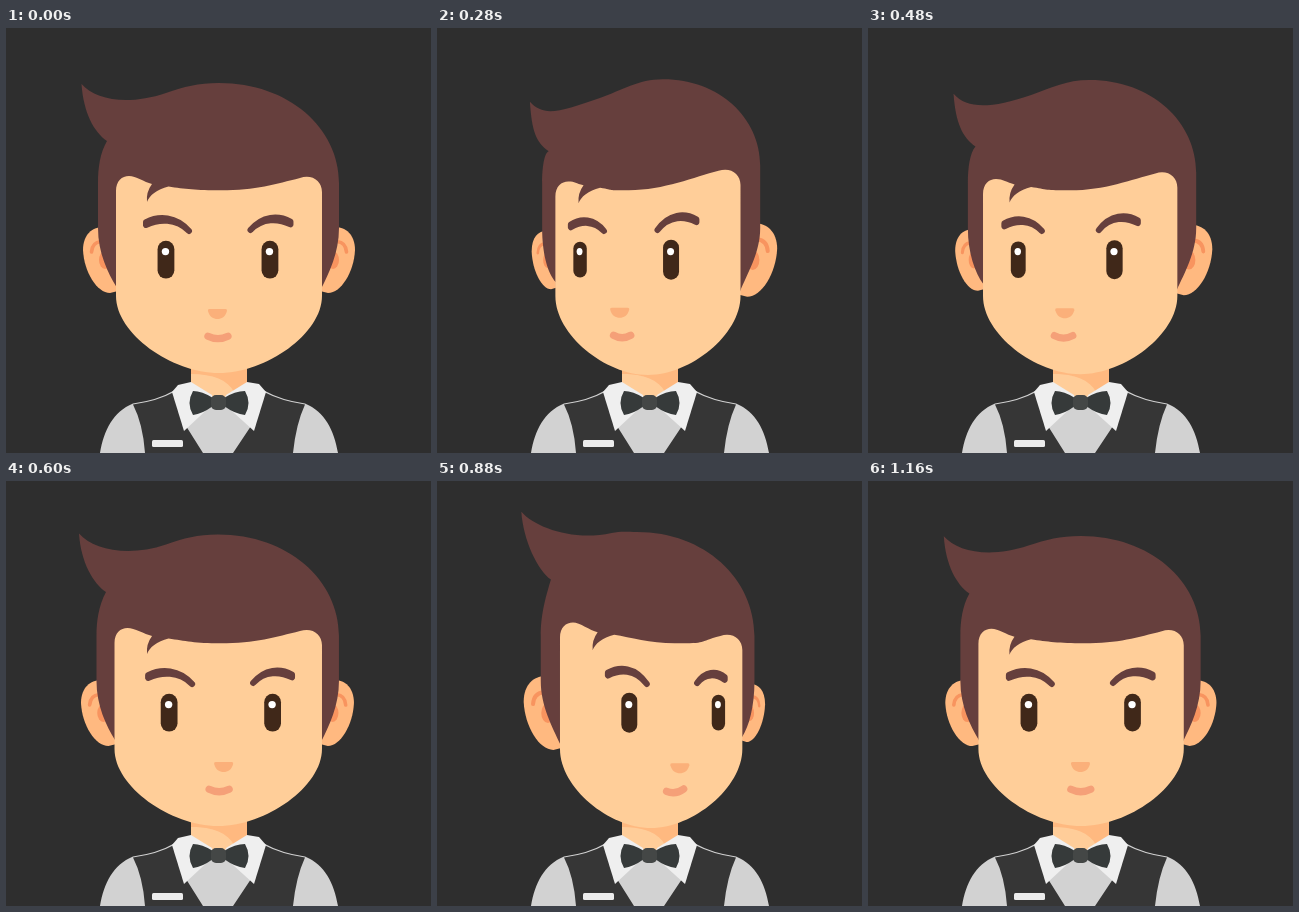
An HTML page for the animation above (1200 ms loop, 425 px wide and 425 px high).

```html
<!DOCTYPE html>
<html lang="en">
<head>
<meta charset="utf-8">
<title>Turning head</title>
<style>
  html, body { margin: 0; width: 100%; height: 100%; overflow: hidden; background: #2e2e2e; }
  svg { display: block; width: 100%; height: 100%; }
  .stroke { fill: none; stroke-linecap: round; }
</style>
</head>
<body>
<svg viewBox="0 0 425 425">
  <rect width="425" height="425" fill="#2e2e2e"/>
  <g id="body">
    <path fill="#d2d2d2" d="M94 425C98 402 107 384 127 375.500Q152 372 168 362.500H258Q275 372 299 375.500C319 384 328 402 332 425Z"/>
    <path fill="#363636" d="M127 376.500Q152 373 168 364L180 398L197 425H139Q137 396 127 376.500Z"/>
    <path fill="#363636" d="M299 376.500Q275 373 258 364L245 398L227 425H287Q290 396 299 376.500Z"/>
    <path fill="#ffcd99" d="M185 335H241V360L213 372L185 358Z"/>
    <path fill="#ffb980" d="M185 335H241V358L228 364C222 352 207 346 185 346Z"/>
    <path fill="#efefef" d="M185 354L172 357L166 364L178 403L208 375L206 367Z"/>
    <path fill="#efefef" d="M241 354L253 356L260 364L248 403L217 375L220 367Z"/>
    <path fill="#363a3a" d="M187 363Q196 363 207 370V378Q196 386 187 387Q180 375 187 363ZM239 363Q229 363 218 370V378Q229 386 239 387Q246 375 239 363Z"/>
    <rect x="205" y="367" width="15" height="15" rx="5" fill="#444746"/>
    <rect x="146" y="412" width="31" height="7" rx="1.5" fill="#ececec"/>
  </g>
  <defs>
    <g id="ear">
      <path fill="#ffb980" d="M24 1C14 -2 0 4 0 23C1 45 14 66 27 66L35 64V8Z"/>
      <ellipse cx="22" cy="33" rx="6" ry="9" fill="#f8945f"/>
      <path class="stroke" stroke="#f8945f" stroke-width="3.6" d="M8.500 25C9 18 13 15 18 14.500"/>
    </g>
  </defs>
  <use id="earL" href="#ear"/>
  <use id="earR" href="#ear"/>
  <path id="hair" fill="#663f3d"/>
  <path id="face" fill="#ffce99"/>
  <g fill="#663f3d" stroke="#663f3d" stroke-width="6" stroke-linejoin="round">
    <path id="browL"/>
    <path id="browR"/>
  </g>
  <g fill="#402819"><rect id="eyeL"/><rect id="eyeR"/></g>
  <g fill="#fff"><ellipse id="glintL" ry="3.6"/><ellipse id="glintR" ry="3.6"/></g>
  <path id="nose" fill="#fbb07a" d="M-8 0H8Q10 0 9.500 2C8 8 4 10 0 10C-4 10 -8 8 -9.500 2Q-10 0 -8 0Z"/>
  <path id="mouth" class="stroke" stroke="#f5a078" stroke-width="7.300"/>
</svg>
<script>
const LOOP = 1200;
const TIMES = [0, 160, 400, 600, 760, 1000, 1160];

// Each track holds its value at the first six times; the last eases back to the first.
const headTracks = {
  turn: [0, -.95, -1, 0, 1, .95],
  left: [110, 114, 120, 108.5, 120, 121],
  right: [316, 307, 304, 316, 304.5, 310],
  browTop: [148, 152, 153, 147, 142, 143],
  templeTop: [149, 144, 142, 149, 153, 153],
  tuftX: [141, 140, 143, 141, 152.5, 153.5],
  tuftY: [174, 175, 175, 173, 170, 170],
  tipX: [75.5, 86, 94, 73, 82, 83],
  tipY: [56, 69.5, 72, 52.5, 33, 37],
  nickX: [101, 107, 113, 100, 111, 112],
  nickY: [113, 121, 122, 111, 100, 102],
  waveX: [160, 160, 165, 160, 172, 172],
  crownX: [213, 222, 226, 212, 200, 204],
  crownY: [55, 52.5, 51, 53.5, 51, 52]
};
const sideTracks = {
  hairL: [92, 99.5, 106.5, 90.5, 101, 102],
  hairR: [333, 326, 323.5, 333, 317, 323.5],
  earL: [77, 88, 95.5, 75, 84.5, 85],
  earR: [349, 343, 340, 348, 328.5, 335],
  eyeL: [160, 147, 145, 163, 188.5, 185],
  eyeR: [264, 242.5, 235.5, 266.5, 279, 278],
  browLo: [140, 134.5, 135.5, 142, 168, 163],
  browLi: [183, 171, 168.5, 186, 207, 203.5],
  browRo: [284.5, 267, 260, 286, 286.5, 288],
  browRi: [244.5, 227, 222, 247, 258, 257],
  nose: [211.5, 189.5, 186, 217.5, 238.5, 237],
  mouth: [212, 192, 187, 213, 234, 233]
};
const tracks = { ...headTracks, ...sideTracks };
for (const v of Object.values(tracks)) v.push(v[0] + .04 * (v[5] - v[0]));

const el = id => document.getElementById(id);
const set = (id, attrs) => {
  for (const k in attrs) el(id).setAttribute(k, attrs[k]);
};

const COUNT = TIMES.length;
const timeAt = i => TIMES[(i + COUNT) % COUNT] + Math.floor(i / COUNT) * LOOP;

// Smooth periodic curve through unevenly spaced keys
function sample(v, t) {
  let i = COUNT - 1;
  while (TIMES[i] > t) i--;
  const at = k => v[(k + COUNT) % COUNT];
  const rate = k => (at(k + 1) - at(k)) / (timeAt(k + 1) - timeAt(k));
  const slope = k => {
    const a = timeAt(k) - timeAt(k - 1), b = timeAt(k + 1) - timeAt(k);
    return (rate(k - 1) * b + rate(k) * a) / (a + b);
  };
  const h = timeAt(i + 1) - timeAt(i), u = (t - timeAt(i)) / h, w = 1 - u;
  return at(i) * w * w * (1 + 2 * u) + at(i + 1) * u * u * (3 - 2 * u)
    + h * u * w * (slope(i) * w - slope(i + 1) * u);
}

function hairPath(p) {
  const { turn, tipX, tipY, nickX, nickY, waveX, crownX, crownY, hairL, hairR, left, right } = p;
  const waveY = crownY + 10 - 7.5 * turn;
  const run = crownX - waveX;
  const rise = .34 - .1 * Math.max(turn, 0);
  const sideY = 155 + 15 * Math.min(turn, 0);
  return `M${tipX} ${tipY}
    C${tipX + 14} ${tipY + 16} ${waveX - 38} ${waveY + 38 * rise} ${waveX} ${waveY}
    C${waveX + run * .35} ${waveY - run * .35 * rise} ${crownX - run * .4} ${crownY} ${crownX} ${crownY}
    C${crownX + (hairR - crownX) * .58} ${crownY} ${hairR} ${crownY + (sideY - crownY) * .45} ${hairR} ${sideY}
    V200 C${hairR} 225 ${right + 7} 245 ${right - .5} ${260 - 3 * turn}
    H${left + .5} V${259 + 4 * turn}
    C${left - 8} 245 ${hairL} 225 ${hairL} 200 V155
    C${hairL} 140 ${hairL + 2} 125 ${nickX} ${nickY}
    C${nickX - 13} ${nickY - 9} ${tipX + 2} ${tipY + 29} ${tipX} ${tipY}Z`;
}

function facePath(p) {
  const { turn, left: l, right: r, browTop: a, templeTop: b, tuftX: x, tuftY: y } = p;
  const cx = (l + r) / 2, half = (r - l) / 2;
  const mid = cx + 2 + 18 * turn;
  const chin = 345 + 1.7 * Math.abs(turn);
  const cheek = 268 + (chin - 268) * .49, jaw = half * .46;
  return `M${l} 268 V${a + 15} C${l} ${a + 5} ${l + 6} ${a} ${l + 13} ${a}
    C${l + 20} ${a} ${x - 3} ${y - 20} ${x + 5} ${y - 18}
    Q${x - 1} ${y - 10} ${x} ${y}
    C${x + 2} ${y - 6} ${x + 10} ${y - 13} ${x + 21.5} ${y - 15.5}
    C${x + 38} ${y - 13} ${mid - 25} 162.3 ${mid} 162.3
    C${mid + 35} 162.3 ${r - 46} ${b + 7} ${r - 22} ${b + 1}
    C${r - 10} ${b - 3} ${r} ${b + 4} ${r} ${b + 15} V268
    C${r} ${cheek} ${cx + jaw} ${chin} ${cx} ${chin}
    C${cx - jaw} ${chin} ${l} ${cheek} ${l} 268Z`;
}

// Thick at the outer end, thin at the inner one
function browPath(outer, oy, inner, iy) {
  const a = outer + (inner - outer) * .3, b = outer + (inner - outer) * .7;
  return `M${outer} ${oy - 1.4} C${a} ${oy - 8} ${b} ${oy - 7.5} ${inner} ${iy}
    C${b} ${oy - 5.5} ${a} ${oy - 4.5} ${outer} ${oy + 1.4}Z`;
}

function drawEar(id, tip, edge, turn) {
  const half = 33 + 3.3 * turn;
  set(id, { transform: `translate(${tip} ${232 - half}) scale(${(edge - tip) / 33} ${half / 33})` });
}

function drawEye(side, x, turn) {
  const w = 16.8 + 1.1 * turn - 1.8 * Math.abs(turn);
  const h = 37.8 + 1.8 * turn;
  set("eye" + side, { x: x - w / 2, y: 231.7 - h / 2, width: w, height: h, rx: w / 2 });
  set("glint" + side, { cx: x - .5, cy: 223.6, rx: w * .22 });
}

function draw(t) {
  const p = {};
  for (const k in tracks) p[k] = sample(tracks[k], t);
  const q = p.turn;
  drawEar("earL", p.earL, p.left, q);
  drawEar("earR", p.earR, p.right, -q);
  set("hair", { d: hairPath(p) });
  set("face", { d: facePath(p) });
  set("browL", { d: browPath(p.browLo, 195.5 - 2 * q, p.browLi, 203) });
  set("browR", { d: browPath(p.browRo, 195 + 2 * q, p.browRi, 202) });
  drawEye("L", p.eyeL, q);
  drawEye("R", p.eyeR, -q);
  set("nose", { transform: `translate(${p.nose} ${281 + q})` });
  const w = 10 - Math.abs(q) * 1.2, my = 308.2 + .8 * q, tilt = Math.max(q, 0);
  set("mouth", { d: `M${p.mouth - w} ${my + tilt} Q${p.mouth} ${my + 5} ${p.mouth + w} ${my - tilt}` });
}

function tick() {
  draw(performance.now() % LOOP);
  requestAnimationFrame(tick);
}
tick();
</script>
</body>
</html>
```
